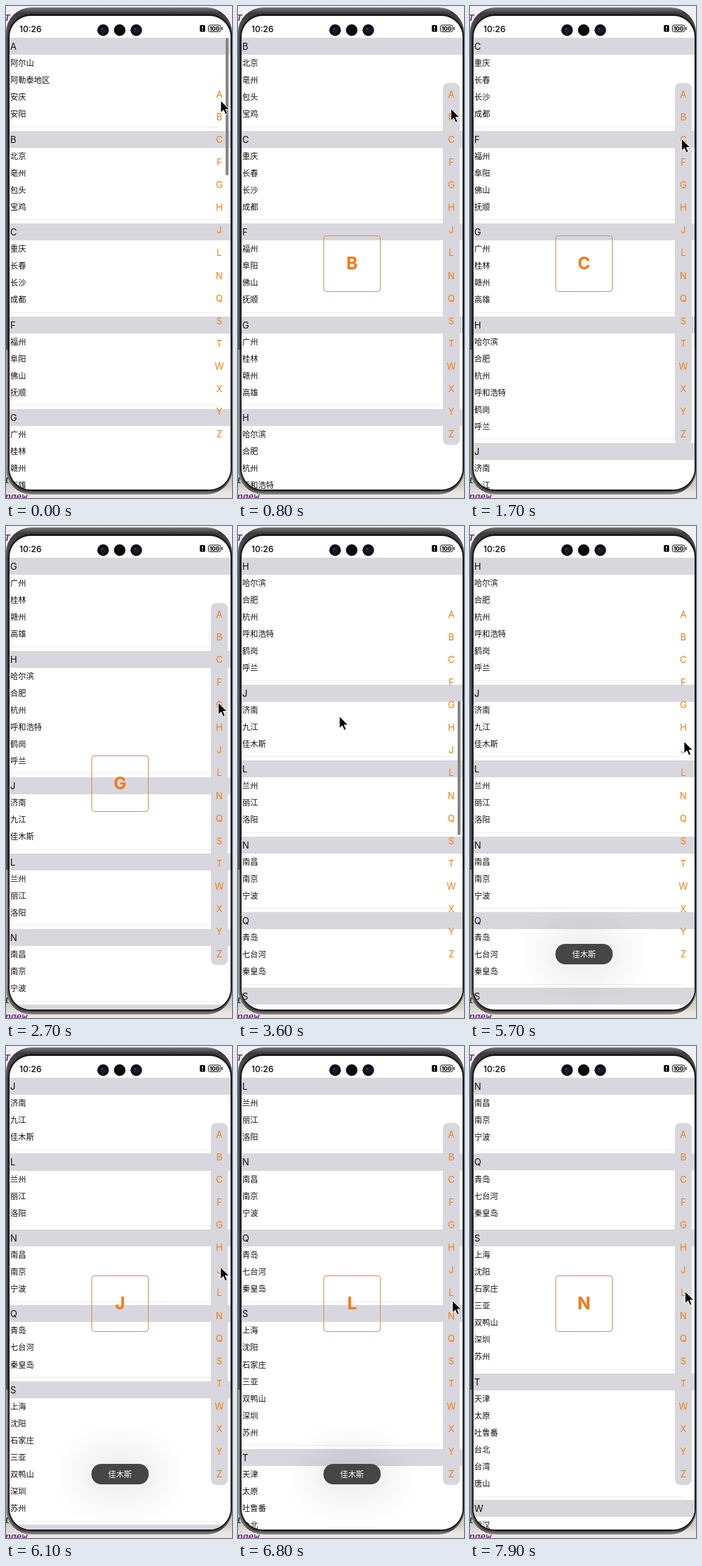
Recreate the animation shown at these times as an HTML page. Size 320 by 697 pixels, loop 8000 ms.

```html
<!DOCTYPE html>
<html lang="zh-CN">
<head>
<meta charset="utf-8">
<style>
html, body { margin: 0; width: 100%; height: 100%; overflow: hidden; }
body { font-family: Inter, "Noto Sans CJK SC", sans-serif; color: #111; }
div { position: absolute; box-sizing: border-box; white-space: nowrap; }
#stage { width: 320px; height: 697px; overflow: hidden; background: linear-gradient(#f1f0f2 487px, #d3cdc6 487px 680px, #e9e6e3 690px); }
.code { font: italic bold 13px/16px "Liberation Mono", monospace; color: #7a2a90; }
#bezel { left: 0; top: 2px; width: 320px; height: 690px; border-radius: 36px;
  background: linear-gradient(#77777a, #3c3c3f 8px, #5c5c60 40px 485px, #aaa49d 485px 650px, #555 684px, #8a8885); }
#screen { left: 5px; top: 14px; width: 313px; height: 671px; border-radius: 30px; overflow: hidden; background: #fff; }
#ring { left: 5px; top: 14px; width: 313px; height: 671px; border-radius: 30px; box-shadow: 0 0 2px 1.5px #0c0c0c, 0 0 3px 2px #222; }
#view { left: 0; top: 31px; width: 313px; height: 640px; overflow: hidden; }
#list { left: 0; top: 0; width: 313px; }
.head, .item { left: 0; width: 313px; height: 24.05px; padding-left: 1px; }
.head { background: #d8d7de; font-size: 13px; line-height: 24px; }
.item { font: 11.2px/23px "Noto Sans CJK SC", sans-serif; }
.rule { left: 1px; width: 295px; height: 1px; background: #ececee; }
#thumb { left: 311px; width: 4px; border-radius: 2px; background: #858589; }
#bar { left: 290px; top: 109px; width: 24px; height: 513px; border-radius: 8px; background: #d8d7de; }
.key { left: 290px; width: 24px; height: 20px; line-height: 20px; text-align: center; font-size: 13px; color: #f57c0a; }
#popup { left: 121px; top: 325px; width: 81px; height: 80px; border: 1px solid #cc9555; border-radius: 4px;
  color: #fa7608; font: bold 24px/78px Inter, sans-serif; text-align: center; }
#toast { left: 121px; top: 592px; width: 81px; height: 29px; border-radius: 14px; background: #454545; color: #fff;
  font: 11.2px/28px "Noto Sans CJK SC", sans-serif; text-align: center; box-shadow: 0 0 55px 18px rgba(0,0,0,.09); }
svg { position: absolute; left: 0; top: 0; }
</style>
</head>
<body>
<div id="stage">
  <div class="code" style="left:-2px;top:10px">T</div>
  <div class="code" style="left:-2px;top:665px;color:#274a2c">t</div>
  <div class="code" style="left:-1px;top:688px">ngew</div>
  <div id="bezel"></div>
  <div id="ring"></div>
  <div id="screen"><div id="view"><div id="list"></div></div></div>
  <svg width="320" height="60">
    <text x="19" y="36.5" font-size="12" font-weight="500">10:26</text>
    <g id="lenses"></g>
    <rect x="274.5" y="27" width="7.5" height="9.5" rx="1.5"/>
    <path d="M278.2 28.7v3.6m0 1.2v1.4" stroke="#fff" stroke-width="1.3"/>
    <rect x="286.5" y="27" width="17.5" height="9.5" rx="2.5" fill="#e4e4e4" stroke="#222"/>
    <path d="M306 30v3.5" stroke="#222" stroke-width="1.5"/>
    <text x="295.3" y="34.8" font-size="8" font-weight="bold" text-anchor="middle">100</text>
  </svg>
  <div id="bar"></div>
  <div id="keys"></div>
  <div id="thumb"></div>
  <div id="popup"></div>
  <div id="toast">佳木斯</div>
  <svg id="cursor" width="16" height="24" viewBox="-1 -1 16 24">
    <path d="M0 0V17.2L4.1 13.5L6.8 19.8L9.7 18.5L7 12.4H12.4Z" stroke="#fff" stroke-width="1"/>
  </svg>
</div>
<script>
const $ = id => document.getElementById(id);
const ROW = 24.05, GAP = 11.25, LOOP = 8000;
const cities = {
  A: '阿尔山 阿勒泰地区 安庆 安阳', B: '北京 亳州 包头 宝鸡', C: '重庆 长春 长沙 成都',
  F: '福州 阜阳 佛山 抚顺', G: '广州 桂林 赣州 高雄', H: '哈尔滨 合肥 杭州 呼和浩特 鹤岗 呼兰',
  J: '济南 九江 佳木斯', L: '兰州 丽江 洛阳', N: '南昌 南京 宁波', Q: '青岛 七台河 秦皇岛',
  S: '上海 沈阳 石家庄 三亚 双鸭山 深圳 苏州', T: '天津 太原 吐鲁番 台北 台湾 唐山', W: '武汉 无锡'
};

function add(parent, cls, top, text = '') {
  const el = document.createElement('div');
  el.className = cls;
  el.style.top = top + 'px';
  el.textContent = text;
  parent.append(el);
}

const offset = {};
let y = 0;
for (const [letter, names] of Object.entries(cities)) {
  offset[letter] = y;
  add($('list'), 'head', y, letter);
  y += ROW;
  for (const name of names.split(' ')) {
    add($('list'), 'item', y, name);
    y += ROW;
  }
  add($('list'), 'rule', y + GAP / 2);
  y += GAP;
}
[...'ABCFGHJLNQSTWXYZ'].forEach((c, i) => add($('keys'), 'key', 115 + i * 32.07, c));
$('lenses').innerHTML = [137.5, 161, 184.5].map((x, i) =>
  `<circle cx="${x}" cy="34.3" r="8.2" fill="#08090c"/>` +
  (i === 1 ? '' : `<circle cx="${x}" cy="34.3" r="4.5" fill="#121d30"/><circle cx="${x - 1.5}" cy="32.5" r="1.3" fill="#34486a"/>`)).join('');

// [time, x, y] of the pointer tip
const path = [[0, 304, 134], [200, 303, 134], [900, 301, 147], [1700, 299.5, 188], [2700, 300.5, 250],
  [2950, 299, 275], [3150, 285, 282], [3600, 143.5, 269.5], [3700, 143.5, 269.5], [4200, 134, 258], [4350, 134, 258],
  [4800, 112, 302], [5100, 113, 302], [5600, 303, 305], [5800, 303, 305], [6100, 303.5, 313],
  [6400, 303.5, 335], [6900, 303.5, 367], [7100, 303.5, 372], [7300, 303.5, 379], [7500, 303.5, 379], [7900, 304.5, 347.5]];
// [time, letter] the list jumps to
const jumps = [[0, 'A'], [800, 'B'], [1400, 'C'], [2000, 'F'], [2500, 'G'], [2900, 'H'], [5900, 'J'], [6400, 'L'], [6900, 'N']];

const clamp = v => Math.max(0, Math.min(1, v));
const pulse = (t, start, end, fade) => clamp((t - start) / fade) * clamp((end - t) / fade);

function tip(t) {
  const i = path.findIndex(p => p[0] > t);
  if (i < 0) return path.at(-1).slice(1);
  const [a, b] = [path[i - 1], path[i]], k = (t - a[0]) / (b[0] - a[0]);
  return [a[1] + (b[1] - a[1]) * k, a[2] + (b[2] - a[2]) * k];
}

function draw(t) {
  const letter = jumps.findLast(j => j[0] <= t)[1], scroll = offset[letter];
  $('list').style.top = -scroll + 'px';
  $('popup').textContent = letter;
  const touched = t < 4500 ? pulse(t, 100, 3400, 100) : pulse(t, 5850, 9000, 100);
  $('bar').style.opacity = $('popup').style.opacity = touched;
  $('thumb').style.opacity = t < 2000 ? clamp((500 - t) / 300) : pulse(t, 3200, 5600, 200);
  $('thumb').style.top = 45 + scroll * .309 + 'px';
  $('thumb').style.height = (scroll ? 190 : 195) + 'px';
  $('toast').style.opacity = pulse(t, 5100, 7050, 150);
  const [px, py] = tip(t);
  $('cursor').style.transform = `translate(${px - 1}px, ${py - 1}px)`;
}

const start = performance.now();
function tick() {
  draw((performance.now() - start) % LOOP);
  requestAnimationFrame(tick);
}
tick();
</script>
</body>
</html>
```
